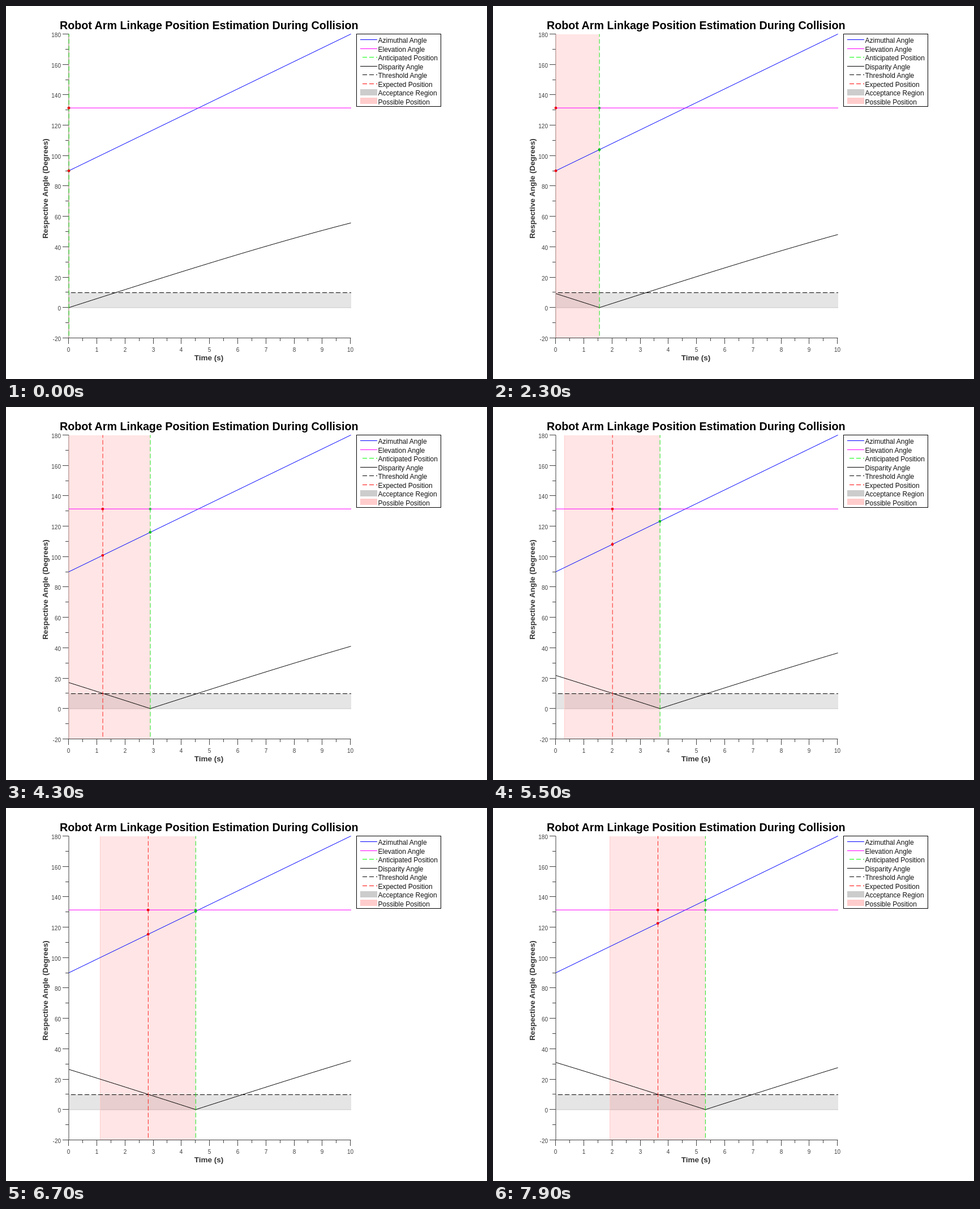
An HTML page for the animation above (8 s loop, 850 by 659 pixels).

```html
<!DOCTYPE html>
<html lang="en">
<head>
<meta charset="utf-8">
<style>
  html, body { margin: 0; width: 850px; height: 659px; overflow: hidden; background: #fff; }
  svg { display: block; font-family: "Liberation Sans", Arial, sans-serif; }
  line, path, rect { fill: none; }
  .bold { font-weight: bold; }
</style>
</head>
<body>
<svg id="stage" width="850" height="659" viewBox="0 0 850 659"></svg>
<script>
const stage = document.getElementById('stage');
const STEPS = 149, LOOP = 80, STEP_MS = 100;
const ELEVATION = 131.35, THRESHOLD = 10;
const TOP = 49.5, BOTTOM = 586.5, RIGHT = 609.5;
const AXIS = '#404040', GREEN = '#1be61b', RED = '#f22';
const rad = Math.PI / 180;
const tilt = Math.abs(Math.cos(ELEVATION * rad));

const xAt = step => 111.2 + step * 498.3 / STEPS;
const yAt = deg => 532.8 - deg * 2.685;
const azimuth = step => 90 + 90 * step / STEPS;

// Great-circle angle between two poses, and its inverse in time steps.
const disparity = steps =>
  2 * Math.asin(tilt * Math.sin(Math.abs(steps) * 45 / STEPS * rad)) / rad;
const reach = deg =>
  2 * Math.asin(Math.sin(deg / 2 * rad) / tilt) / rad * STEPS / 90;

function add(tag, attrs, text) {
  const el = document.createElementNS('http://www.w3.org/2000/svg', tag);
  set(el, attrs);
  if (text !== undefined) el.textContent = text;
  return stage.appendChild(el);
}
function set(el, attrs) {
  for (const name in attrs) el.setAttribute(name, attrs[name]);
}
function line(x1, y1, x2, y2, stroke, dashed) {
  const el = add('line', { x1, y1, x2, y2, stroke });
  if (dashed) set(el, { 'stroke-dasharray': '8 4', 'stroke-dashoffset': 8 });
  return el;
}
function label(text, x, y, size, attrs) {
  return add('text', { x, y, 'font-size': size, ...attrs }, text);
}
function box(x, y, width, height, fill) {
  return add('rect', { x, y, width, height, style: 'fill:' + fill });
}
const dot = fill => add('circle', { r: 2.4, fill });

// Axes
line(111, TOP, 111, BOTTOM, AXIS);
line(111, BOTTOM, RIGHT, BOTTOM, AXIS);
for (let deg = -20; deg <= 180; deg += 10) {
  const y = Math.floor(yAt(deg)) + 0.5, major = deg % 20 === 0;
  line(major ? 100 : 105, y, 111, y, AXIS);
  if (major) label(deg, 97, y + 5, 10, { 'text-anchor': 'end', fill: AXIS });
}
for (let half = 0; half <= 20; half++) {
  const x = Math.floor(110.6 + half * 24.9) + 0.5, major = half % 2 === 0;
  line(x, 587, x, major ? 597 : 592, AXIS);
  if (major) label(half / 2, x, 610.5, 10, { 'text-anchor': 'middle', fill: AXIS });
}
label('Robot Arm Linkage Position Estimation During Collision', 358.8, 40.5, 19.7,
  { class: 'bold', 'text-anchor': 'middle' });
label('Time (s)', 358.5, 626, 13.5, { class: 'bold', 'text-anchor': 'middle', fill: '#333' });
label('Respective Angle (Degrees)', 0, 0, 13.4, {
  class: 'bold', 'text-anchor': 'middle', fill: '#333',
  transform: 'translate(74 322.5) rotate(-90)'
});

// Plot layers
box(112, 506, 498, 27, 'rgba(0,0,0,.1)');
line(112, 533, 610, 533, '#c8c8c8');
const region = box(112, 50, 0, 536, 'rgba(255,0,0,.1)');
const regionEdge = line(0, 50, 0, 586, '#fcc');
line(111, yAt(azimuth(0)), RIGHT, TOP, '#00f');
line(111, yAt(ELEVATION), 610, yAt(ELEVATION), '#f0f');
const curve = add('path', { stroke: '#000' });
line(111, 506.5, 610, 506.5, '#000', true);
const expectedLine = line(0, BOTTOM, 0, TOP, RED, true);
const anticipatedLine = line(0, BOTTOM, 0, TOP, GREEN, true);
const greenDots = [dot('#0b2a'), dot('#0b2')];
const redDots = [dot('#e01'), dot('#e01')];

// Legend
add('rect', { x: 619.5, y: 49.5, width: 149, height: 128, stroke: '#000' });
[
  ['Azimuthal Angle', '#00f'],
  ['Elevation Angle', '#f0f'],
  ['Anticipated Position', '#0f0', true],
  ['Disparity Angle', '#000'],
  ['Threshold Angle', '#000', true],
  ['Expected Position', '#f00', true],
  ['Acceptance Region', '#ccc'],
  ['Possible Position', '#fcc']
].forEach(([text, color, dashed], i) => {
  const y = Math.round(59.1 + i * 15.5) + 0.5;
  if (i < 6) line(626, y, 656, y, color, dashed);
  else box(626, i === 6 ? 147 : 162, 30, 11, color);
  label(text, 657.5, 65.3 + i * 15.5, 12, { fill: '#111' });
});

function moveMarker(marker, dots, step) {
  const x = xAt(step);
  set(marker, { x1: x, x2: x });
  set(dots[0], { cx: x - 0.2, cy: yAt(ELEVATION) });
  set(dots[1], { cx: x - 0.2, cy: yAt(azimuth(step)) });
}

function draw(now) {
  const step = Math.floor(now / STEP_MS) % LOOP;
  const expected = step < 28 ? 0 : step - reach(THRESHOLD);
  const left = xAt(Math.max(0, step - reach(2 * THRESHOLD)));

  moveMarker(anticipatedLine, greenDots, step);
  moveMarker(expectedLine, redDots, expected);
  set(expectedLine, { visibility: expected ? 'visible' : 'hidden' });
  set(region, { x: left, width: xAt(step) - left });
  set(regionEdge, { x1: left, x2: left });

  const points = [];
  for (let i = 0; i <= STEPS; i++) {
    points.push(xAt(i).toFixed(2) + ' ' + yAt(disparity(i - step)).toFixed(2));
  }
  set(curve, { d: 'M' + points.join('L') });
  requestAnimationFrame(() => draw(performance.now() - start));
}
const start = performance.now();
draw(0);
</script>
</body>
</html>
```
